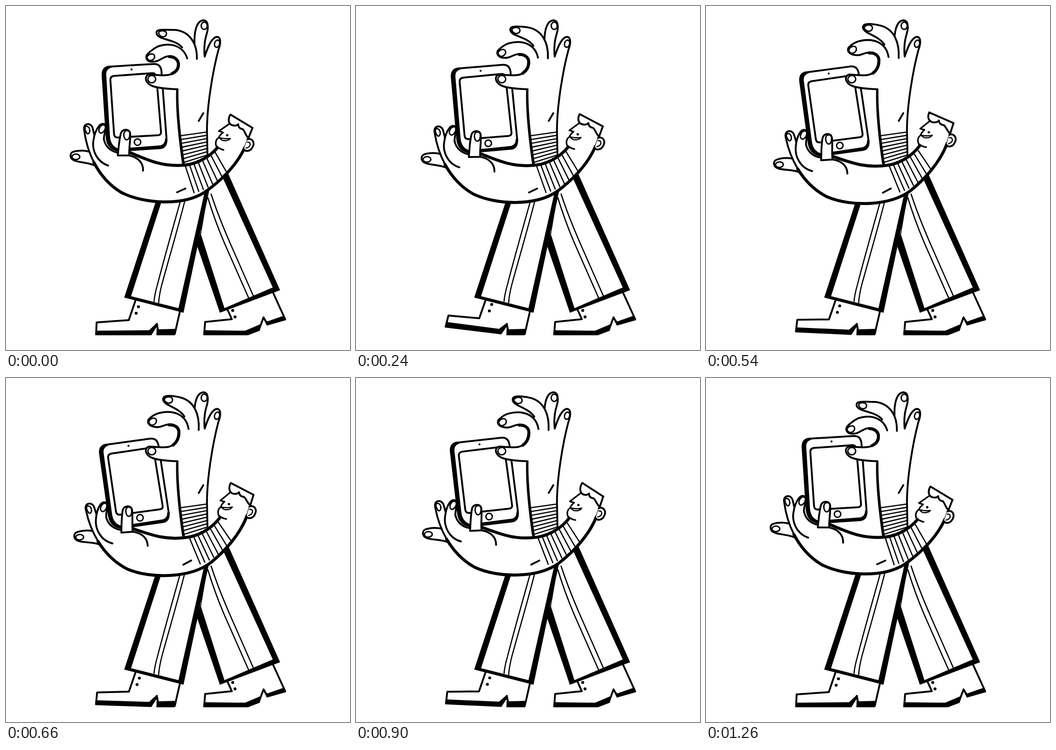
Write an HTML page that moves like this. It is 748 by 748 pixels and loops after 1290 ms.

```html
<!DOCTYPE html>
<html lang="en">
<head>
<meta charset="utf-8">
<title>Walking with a tablet</title>
<style>
  html, body { margin: 0; width: 100%; height: 100%; overflow: hidden; background: #fff; }
  svg { display: block; width: 100vw; height: 100vh; }
  path, circle, ellipse { fill: none; stroke: #000; stroke-width: 4; stroke-linecap: round; stroke-linejoin: round; }
  .w { fill: #fff; }
  .k { fill: #000; stroke: none; }
  .p { fill: #fff; stroke: none; }
  .thin { stroke-width: 2.6; }
  .nail { stroke-width: 3; fill: #fff; }
  .bold { stroke-width: 6.5; }
  .mid { stroke-width: 4.5; }
</style>
</head>
<body>
<svg viewBox="0 0 748 748">
  <!-- boots -->
  <path id="boot" class="w"/>
  <path id="sole" class="k"/>
  <path class="k" d="M328 690L332 703L369 702L367 716L327 716Z"/>
  <circle id="dotA" class="k" r="3.2"/>
  <circle id="dotB" class="k" r="3.2"/>
  <path class="w" d="M482 661L491 681L433 687L431 713L524 713L550 704L560 677L568 692L607 681L581 624"/>
  <path class="k" d="M430 705L520 706L553 692L552 706L526 716L429 716ZM560 675L568 686L605 673L609 683L567 695Z"/>
  <circle class="k" cx="493" cy="662" r="3.2"/>
  <circle class="k" cx="498" cy="676" r="3.2"/>

  <!-- trousers -->
  <path class="k" d="M430 400L483 364L596 618L465 667L415 520L424 490Z"/>
  <path class="p" d="M440 402L471 373L580 612L475 657L424 497Z"/>
  <path class="thin" d="M439 417C452 460 464 491 480 527L529 638M446 409C460 452 476 490 491 524L539 633"/>
  <path class="k" d="M326 424L443 396L386 667L257 634Z"/>
  <path class="p" d="M338 426L432 404L375 657L272 631Z"/>
  <path class="thin" d="M379 425C365 475 345 545 329 607Q323 628 322 642M389 423C376 475 357 540 339 605Q333 628 332 645"/>

  <!-- raised sleeve -->
  <path class="k" d="M370 180C368 225 375 290 383 344L389 344C381 290 374 230 375 180Z"/>
  <g id="cuff"></g>

  <g class="sway">
    <path class="w" d="M211 151Q209 135 223 132L322 126Q336 126 338 141L349 288Q349 303 336 306L246 313Q225 310 222 290Z"/>
    <path class="k" d="M208 151Q207 133 223 130L230 134Q217 137 218 150L226 282Q227 304 244 310L336 303Q346 300 346 288L351 288Q352 308 337 311L245 317Q220 313 217 288Z"/>
    <path class="w" d="M227 162Q226 153 235 152L318 146Q326 146 327 154L337 273Q338 280 331 281L243 286Q236 286 235 279Z"/>
    <circle class="w" style="stroke-width:3" cx="286" cy="296" r="7"/>
    <circle class="k" cx="273" cy="138" r="2.2"/>
  </g>

  <!-- raised hand -->
  <path d="M410 85C409 65 411 32 430 31C441 32 440 50 436 62C432 75 430 90 432 110C437 95 446 68 459 67C468 68 467 82 462 95C450 140 437 215 437 270L438 322"/>
  <path id="middle" class="w"/>
  <path id="pinch" class="w"/>
  <path id="crook" class="bold"/>
  <path d="M429 233L419 250"/>
  <ellipse class="nail" cx="431" cy="43" rx="6.5" ry="8"/>
  <ellipse class="nail" cx="459" cy="82" rx="5.5" ry="8" transform="rotate(15 459 82)"/>
  <ellipse class="nail" cx="317" cy="159" rx="8.5" ry="8"/>
  <path id="nailA" class="nail"/>
  <path id="nailB" class="nail"/>

  <!-- arm, hand and head that sway with the tablet -->
  <g class="sway">
    <path class="w" d="M195 348C182 340 160 341 149 336C138 332 138 320 146 317C158 313 174 314 184 318"/>
    <ellipse class="nail" cx="152" cy="328" rx="8.5" ry="6"/>
    <path class="p" d="M170 270C175 310 195 372 250 405C300 431 385 435 432 405C462 384 500 350 519 308L536 265L505 258L480 258L463 272L472 276L457 293L457 303L459 309C445 325 420 343 388 346C340 350 310 336 268 318L243 322C225 316 211 302 212 286L200 270L189 266Z"/>
    <g id="knit"></g>
    <path class="w" d="M170 270C167 254 184 253 188 264C190 271 191 278 193 284"/>
    <path d="M170 270C175 310 195 372 250 405"/>
    <path class="bold" d="M191 340C204 365 222 388 250 405C300 431 385 435 432 405C462 384 500 350 519 308"/>
    <path class="w" d="M222 347C196 338 187 312 190 293C192 279 196 268 203 260C210 253 218 257 218 264C216 273 212 282 213 291"/>
    <path d="M213 290C216 306 228 316 243 319"/>
    <path class="bold" d="M268 318C310 336 340 350 388 346C420 343 445 325 459 309"/>
    <path class="w" d="M243 325C245 308 246 290 250 276C254 266 269 267 270 277C271 292 267 310 268 325Z"/>
    <path d="M268 325C286 329 299 340 298 358M372 405L390 397"/>
    <path class="nail" d="M172 263C175 260 181 262 182 269C183 275 179 280 176 277C173 273 171 268 172 263Z"/>
    <path class="nail" d="M203 266C206 258 215 256 216 262C217 269 210 278 205 276C202 274 201 270 203 266Z"/>
    <path class="nail" d="M257 275C260 269 268 270 269 276C270 284 267 291 262 291C257 290 255 281 257 275Z"/>

    <path id="hair" class="w"/>
    <path d="M536 265L519 308"/>
    <path class="w" d="M525 290C535 286 542 297 536 307C531 317 520 317 517 311"/>
    <path class="thin" d="M525 296C533 295 534 306 522 309"/>
    <path style="stroke-width:3.4" d="M486 256L463 272L472 275C467 279 464 282 463 286C456 290 455 298 457 304L459 309M457 304Q464 311 473 313"/>
    <path class="thin" d="M463 286Q476 290 488 288Q482 295 470 292Z"/>
    <circle class="k" cx="481" cy="281" r="2.6"/>
  </g>
</svg>

<script>
const LOOP = 1290, STEP = 30;
const $ = id => document.getElementById(id);

// Blend two paths that share the same commands.
const mix = (a, b, k) => {
  const to = b.match(/-?[\d.]+/g);
  let i = 0;
  return a.replace(/-?[\d.]+/g, n => (+n + (to[i++] - n) * k).toFixed(2));
};

const ramp = (keys, t) => {
  let i = 1;
  while (keys[i][0] < t) i++;
  const [t0, v0] = keys[i - 1], [t1, v1] = keys[i];
  return v0 + (v1 - v0) * (t - t0) / (t1 - t0);
};

const fingerKeys = [[0, 0], [120, .25], [240, .57], [330, .74], [420, .92], [540, .98], [660, 1],
  [810, .99], [900, .93], [960, .6], [1020, .2], [1110, .04], [1290, 0]];
const toeKeys = [[0, 0], [60, .2], [150, .8], [240, 1], [420, .6], [540, .38], [660, .28],
  [780, .34], [900, .38], [960, .24], [1020, .06], [1080, 0], [1290, 0]];

const fingers = {
  pinch: [
    "M373 181C340 180 318 177 310 169C300 160 304 150 312 149C325 150 340 152 352 150C368 148 377 138 376 127C376 115 366 109 355 109C340 109 335 122 318 121C308 122 303 114 306 107C310 101 322 92 330 88C360 78 386 88 394 114",
    "M373 181C340 180 318 177 310 169C300 160 304 150 312 149C325 150 340 152 352 150C368 147 378 133 377 118C376 104 362 99 352 101C340 103 335 109 322 106C312 104 306 98 310 90C316 84 324 78 334 76C362 69 392 78 397 111"],
  crook: [
    "M355 110C366 110 375 117 375 127C375 136 370 143 361 147",
    "M355 102C366 101 376 107 376 118C376 130 371 140 363 146"],
  middle: [
    "M383 90C372 77 350 74 340 70C328 66 326 60 328 55C332 50 350 52 368 52C398 55 416 80 415 115",
    "M388 84C380 70 358 62 350 57C342 52 339 46 344 41C350 37 368 39 382 43C410 52 421 80 419 113"],
  nailA: [
    "M307 110C311 103 322 102 323 109C324 116 316 120 311 118C308 116 306 113 307 110Z",
    "M311 94C315 86 326 85 327 92C328 99 320 104 315 102C312 100 310 97 311 94Z"],
  nailB: [
    "M333 56C339 52 349 54 349 60C349 67 341 68 337 66C333 63 331 59 333 56Z",
    "M345 45C350 39 360 40 362 46C363 53 356 56 351 54C346 52 343 48 345 45Z"]
};
const foot = {
  boot: [
    "M282 639L267 683L197 688L196 713L314 713L328 691L332 713L367 713L378 665",
    "M282 639L268 679L201 673L195 697L314 711L328 691L332 713L367 713L378 665"],
  sole: [
    "M195 706L311 705L328 689L330 694L316 716L194 716Z",
    "M196 687L311 702L328 689L330 694L316 714L193 699Z"]
};
const hair = [
  "M536 265L488 236C484 242 481 254 491 259C497 261 503 260 505 257C505 264 509 267 515 268C520 273 522 285 530 290",
  "M536 265L481.5 240.5C479 246 478 256 488 260C495 262 501 261 504 257C505 264 509 267 515 268C520 273 522 285 530 290"];

const rib = (id, d) => {
  const p = document.createElementNS("http://www.w3.org/2000/svg", "path");
  p.setAttribute("class", "thin");
  p.setAttribute("d", d);
  $(id).append(p);
};
for (let i = 0; i < 8; i++) {
  const k = i / 7, bow = 4 * k * (1 - k);
  rib("cuff", mix("M380 282L437 274", "M387 340L438 324", k));
  // The knit fans out along the bend of the arm.
  rib("knit", `M${389 + 64 * k} ${345 - 30 * k + 4 * bow}L${409 + 71 * k} ${406 - 44 * k + 7 * bow}`);
}

const blend = (set, k) => {
  for (const id in set) $(id).setAttribute("d", mix(...set[id], k));
};
const place = (id, x, y) => {
  $(id).setAttribute("cx", x);
  $(id).setAttribute("cy", y);
};
const swaying = document.querySelectorAll(".sway");

function draw(now) {
  const t = Math.floor(now % LOOP / STEP) * STEP;
  const turn = 2 * Math.PI * t / LOOP;
  const sway = (1 - Math.cos(turn)) / 2;
  const toe = ramp(toeKeys, t);
  for (const g of swaying) g.setAttribute("transform", `rotate(${-4.4 * sway} 393 230)`);
  blend(fingers, ramp(fingerKeys, t));
  blend(foot, toe);
  blend({ hair }, Math.sin(turn) * sway);
  place("dotA", 288 + 7 * toe, 654 - 5 * toe);
  place("dotB", 283 + 7 * toe, 668 - 5 * toe);
}

const start = performance.now();
const tick = () => {
  draw(performance.now() - start);
  requestAnimationFrame(tick);
};
tick();
</script>
</body>
</html>
```
